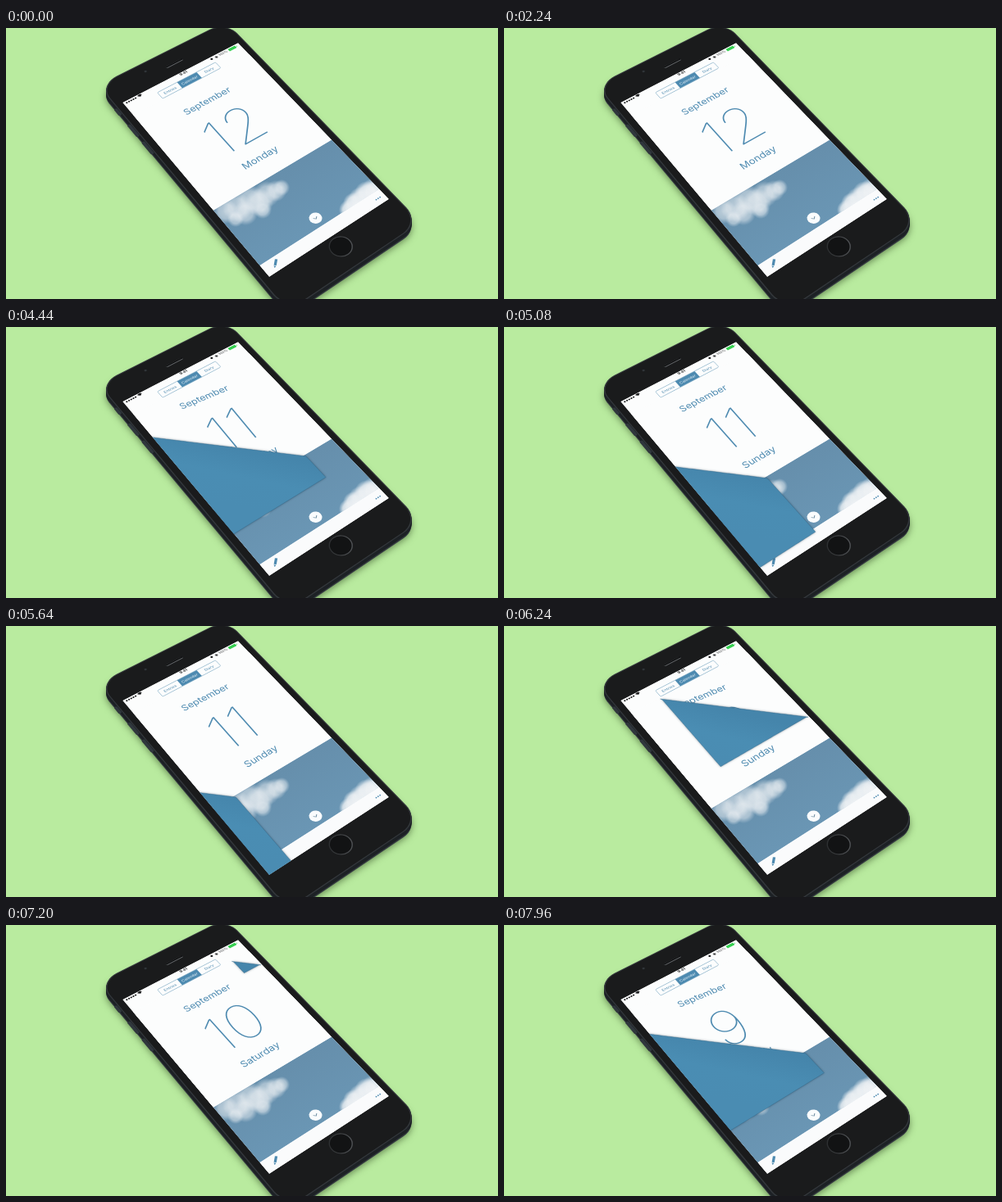
Write an HTML page with a canvas that moves like this. It is 600 by 331 pixels and loops after 8 s.

```html
<!DOCTYPE html>
<html>
<head>
<meta charset="utf-8">
<style>
html, body { margin: 0; width: 100%; height: 100%; overflow: hidden; background: #b9eb9f; }
canvas { display: block; width: 600px; height: 331px; }
</style>
</head>
<body>
<canvas id="stage"></canvas>
<script>
const canvas = document.getElementById('stage');
const ctx = canvas.getContext('2d');
const dpr = window.devicePixelRatio || 1;
canvas.width = 600 * dpr;
canvas.height = 331 * dpr;

const W = 414, H = 736, TOP = 60, BOTTOM = 475, BAR = 693, R = 8;
const BLUE = '#4d8ab0', LOOP = 8000;
const FONT = 'Inter, "Open Sans", "Liberation Sans", sans-serif';
const DAYS = [['12', 'Monday'], ['11', 'Sunday'], ['10', 'Saturday'], ['9', 'Friday']];

// Each turn: [time, fold position] pairs; the fold is the line y = x + k.
const TURNS = [
  [[3220, -354], [3560, -186], [4440, 166], [5640, 410], [5900, 500]],
  [[5920, -354], [6560, 284], [7000, 500]],
  [[7080, -354], [7960, 160], [8400, 300]]
];

// Screen units to stage, in perspective.
function P(x, y) {
  const u = x / W, v = y / H, w = 1 + 0.0603 * u - 0.1103 * v;
  return [(158.1 * u + 143.6 * v + 142) / w, (-71.9 * u + 179.5 * v + 91) / w];
}

function base() { ctx.setTransform(dpr, 0, 0, dpr, 0, 0); }

// Draws in screen units around the point (x, y).
function at(x, y, draw, angle = 0) {
  const o = P(x, y), a = P(x + 1, y), b = P(x, y + 1);
  ctx.save();
  base();
  ctx.translate(...o);
  ctx.rotate(angle);
  ctx.transform(a[0] - o[0], a[1] - o[1], b[0] - o[0], b[1] - o[1], 0, 0);
  draw();
  ctx.restore();
}

function text(s, x, y, size, color, weight = 400, angle = 0) {
  at(x, y, () => {
    ctx.font = `${weight} ${size}px ${FONT}`;
    ctx.textAlign = 'center';
    ctx.textBaseline = 'alphabetic';
    ctx.fillStyle = color;
    ctx.fillText(s, 0, size * 0.36);
  }, angle);
}

function disc(x, y, r, color) {
  at(x, y, () => {
    ctx.fillStyle = color;
    ctx.beginPath();
    ctx.arc(0, 0, r, 0, 7);
    ctx.fill();
  });
}

function trace(points) {
  ctx.beginPath();
  points.forEach(p => ctx.lineTo(...P(...p)));
  ctx.closePath();
}

function shape(points, color) {
  trace(points);
  ctx.fillStyle = color;
  ctx.fill();
}

const rect = (x, y, w, h) => [[x, y], [x + w, y], [x + w, y + h], [x, y + h]];

function roundRect(x, y, w, h, r) {
  const points = [];
  for (let i = 0; i < 4; i++) {
    const cx = i === 1 || i === 2 ? x + w - r : x + r;
    const cy = i > 1 ? y + h - r : y + r;
    for (let j = 0; j <= 10; j++) {
      const a = Math.PI * (1 + i / 2 + j / 20);
      points.push([cx + r * Math.cos(a), cy + r * Math.sin(a)]);
    }
  }
  return points;
}

function linear(x0, y0, x1, y1, ...colors) {
  const g = ctx.createLinearGradient(x0, y0, x1, y1);
  colors.forEach((c, i) => g.addColorStop(i / (colors.length - 1), c));
  return g;
}

function puff(x, y, r, alpha) {
  const g = ctx.createRadialGradient(x, y, 0, x, y, r);
  g.addColorStop(0, `rgba(240,243,245,${alpha})`);
  g.addColorStop(0.6, `rgba(236,240,243,${alpha * 0.8})`);
  g.addColorStop(1, 'rgba(225,233,239,0)');
  ctx.fillStyle = g;
  ctx.fillRect(x - r, y - r, 2 * r, 2 * r);
}

function body() {
  const outline = roundRect(-23, -99, 458, 947, 62);
  for (let i = 8; i > 0; i--) {
    ctx.save();
    ctx.translate(0, i * 0.8);
    if (i === 8) {
      ctx.shadowColor = 'rgba(45,70,30,.6)';
      ctx.shadowBlur = 9 * dpr;
      ctx.shadowOffsetY = 2 * dpr;
    }
    shape(outline, i > 6 ? '#343a40' : '#1d2125');
    ctx.restore();
  }
  [[-2, 30], [72, 54], [150, 54]].forEach(([y, h]) => {
    ctx.save();
    ctx.translate(0, 4);
    shape(roundRect(-28, y, 10, h, 4), '#30373d');
    ctx.restore();
  });
  shape(outline, '#34383c');
  shape(roundRect(-20, -96, 452, 941, 60), '#1a1b1c');
  shape(roundRect(178, -45, 58, 7, 3.5), '#66696c');
  shape(roundRect(178, -45, 58, 4, 2), '#08090a');
  disc(119, -65, 4, '#303438');
  at(209, 776, () => {
    ctx.beginPath();
    ctx.arc(0, 0, 31, 0, 7);
    ctx.fillStyle = '#121314';
    ctx.fill();
    ctx.lineWidth = 3;
    ctx.strokeStyle = linear(-33, -20, 33, 20, '#292b2d', '#55585b');
    ctx.stroke();
  });
}

function picture() {
  ctx.save();
  trace(rect(0, BOTTOM, W, BAR - BOTTOM));
  ctx.clip();
  ctx.fillStyle = linear(330, 180, 370, 250, '#668fac', '#6a96b4');
  ctx.fillRect(240, 120, 240, 190);
  [[268, 224, 15], [282, 219, 18], [292, 226, 15], [298, 210, 18], [309, 213, 17],
   [318, 203, 16], [329, 199, 13], [336, 195, 10], [280, 233, 10], [313, 222, 11]]
    .forEach(p => puff(...p, 0.62));
  [[418, 222, 12], [424, 214, 13], [433, 210, 16], [440, 202, 15], [449, 199, 16],
   [432, 222, 16], [457, 190, 10]].forEach(p => puff(...p, 1));
  trace(rect(0, BOTTOM - 4, W, 4));
  ctx.shadowColor = 'rgba(35,60,80,.6)';
  ctx.shadowBlur = 4 * dpr;
  ctx.fill();
  ctx.restore();

  shape(rect(0, BAR, W, H - BAR), '#fafbfc');
  disc(210, 663, 18, '#fafcfd');
  at(210, 663, () => {
    ctx.strokeStyle = '#7895a8';
    ctx.lineWidth = 2.5;
    ctx.beginPath();
    ctx.moveTo(-6, -3);
    ctx.lineTo(0, 3);
    ctx.lineTo(6, -3);
    ctx.stroke();
  });
  [-7, 0, 7].forEach(d => disc(391 + d, 716, 2.2, BLUE));
  at(38, 712, () => {
    ctx.rotate(Math.PI / 4);
    ctx.fillStyle = BLUE;
    ctx.fillRect(-3.5, -12, 7, 19);
    ctx.beginPath();
    ctx.moveTo(-3.5, 9);
    ctx.lineTo(3.5, 9);
    ctx.lineTo(0, 15);
    ctx.fill();
  });
}

function header() {
  for (let i = 0; i < 5; i++) disc(10 + i * 7.5, 8, 2.9, '#1c1d1e');
  at(55, 12, () => {
    ctx.fillStyle = '#1c1d1e';
    ctx.beginPath();
    ctx.moveTo(0, 0);
    ctx.arc(0, 0, 10, -2.4, -0.75);
    ctx.fill();
  });
  text('9:41', 207, 7, 13, '#1c1d1e', 600);
  disc(309, 9, 4, '#1c1d1e');
  text('∗', 325, 10, 15, '#1c1d1e', 600);
  text('100%', 351, 9, 12, '#3c3e40');
  shape(roundRect(372, 4, 27, 11, 3), '#35cf50');
  shape(rect(401, 7, 2, 5), '#35cf50');

  const frame = roundRect(103, 27, 208, 29, 4);
  shape(rect(172, 27, 70, 29), BLUE);
  trace(frame);
  ctx.strokeStyle = '#6f9fbd';
  ctx.lineWidth = 0.6;
  ctx.stroke();
  text('Entries', 138, 42, 13, BLUE);
  text('Calendar', 207, 42, 13, '#eef5f9');
  text('Diary', 277, 42, 13, BLUE);
}

// One sheet; spread pulls its lines apart and tilts them until it settles.
function sheet(day, spread) {
  const [number, name] = DAYS[day];
  const tilt = spread ** 3;
  shape(rect(0, TOP, W, BOTTOM - TOP), '#fcfdfd');
  text('September', 204 - 2 * spread, 140 - 14 * spread, 31, BLUE, 400, 0.1 * tilt);
  text(number, 207 - 9 * spread, 278 - 4 * spread, 180, BLUE, 100, 0.04 * tilt);
  text(name, 208 + spread, 404 + 5 * spread, 31, BLUE);
}

const past = (p, k) => (p[0] + k - p[1]) / Math.SQRT2;

// Keeps the part where sign * (distance past the fold - limit) is positive.
function cut(points, k, limit, sign) {
  const out = [];
  points.forEach((a, i) => {
    const b = points[(i + 1) % points.length];
    const da = sign * (past(a, k) - limit), db = sign * (past(b, k) - limit);
    if (da >= 0) out.push(a);
    if (da * db < 0) {
      const t = da / (da - db);
      out.push([a[0] + (b[0] - a[0]) * t, a[1] + (b[1] - a[1]) * t]);
    }
  });
  return out;
}

// Wraps a flat point around the roll of radius R.
function curl(p, k) {
  const q = past(p, k), d = q + R;
  const o = d < Math.PI * R ? R * Math.sin(d / R) : Math.PI * R - d;
  const move = (o - R - q) / Math.SQRT2;
  return [p[0] + move, p[1] - move];
}

function flap(k) {
  const flat = cut(rect(0, TOP, W, BOTTOM - TOP), k, R * (Math.PI / 2 - 1), 1);
  if (flat.length < 3) return;
  const points = [];
  flat.forEach((a, i) => {
    const b = flat[(i + 1) % flat.length];
    for (let j = 0; j < 60; j++) {
      const t = j / 60;
      points.push(curl([a[0] + (b[0] - a[0]) * t, a[1] + (b[1] - a[1]) * t], k));
    }
  });
  const x = W / 2, y = x + k, a = P(x, y), b = P(x - 140, y + 140);
  ctx.save();
  ctx.shadowColor = 'rgba(20,45,65,.5)';
  ctx.shadowBlur = 3 * dpr;
  shape(points, linear(...a, ...b, '#4585ab', '#4a8db3', '#4a8cb2'));
  ctx.restore();
  ctx.strokeStyle = 'rgba(45,98,132,.6)';
  ctx.lineWidth = 0.6;
  ctx.stroke();
}

function track(keys, t) {
  if (t <= keys[0][0]) return keys[0][1];
  for (let i = 1; i < keys.length; i++) {
    const [t0, k0] = keys[i - 1], [t1, k1] = keys[i];
    if (t < t1) return k0 + (k1 - k0) * (t - t0) / (t1 - t0);
  }
  return keys[keys.length - 1][1];
}

const spreadAt = k => track([[170, 1], [284, 0.6], [420, 0.6], [500, 0]], k);

function draw(t) {
  base();
  ctx.fillStyle = '#b9eb9f';
  ctx.fillRect(0, 0, 600, 331);
  body();

  ctx.save();
  trace(rect(0, 0, W, H));
  ctx.clip();
  shape(rect(0, 0, W, H), '#fcfdfd');
  picture();
  const day = TURNS.filter(keys => t >= keys[keys.length - 1][0]).length;
  const turn = TURNS[day];
  if (turn && t > turn[0][0]) {
    const k = track(turn, t);
    sheet(day + 1, spreadAt(k));
    ctx.save();
    trace(cut(rect(0, TOP, W, BOTTOM - TOP), k, 0, -1));
    ctx.clip();
    sheet(day, 0);
    ctx.restore();
    header();
    flap(k);
  } else {
    sheet(day, 0);
    header();
  }
  ctx.restore();
}

function tick(now) {
  draw(now % LOOP);
  requestAnimationFrame(tick);
}
requestAnimationFrame(tick);
</script>
</body>
</html>
```
